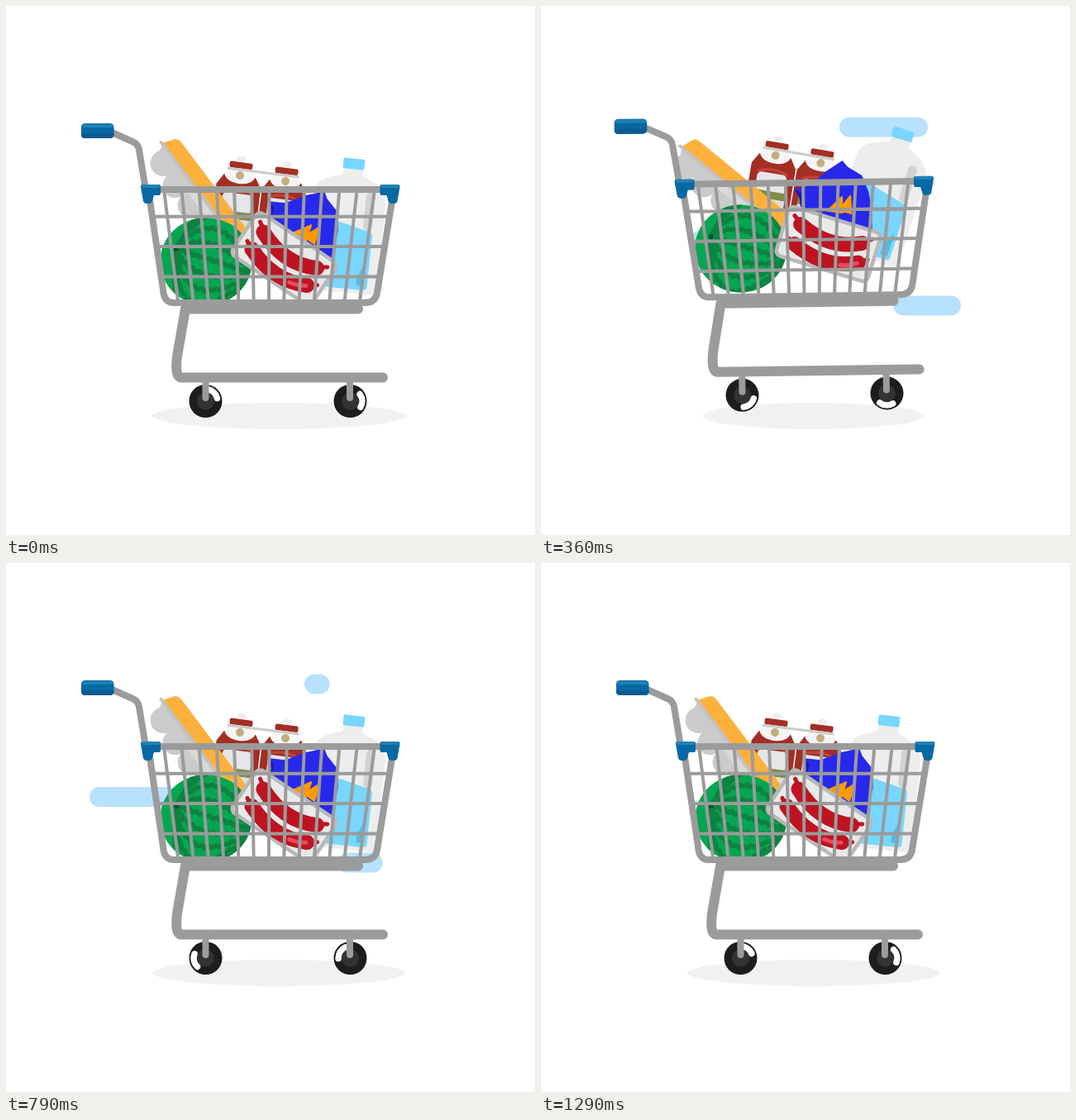
Animation, 640 px wide and 640 px high, one loop 1.37 s. Source, as an HTML page:

```html
<!DOCTYPE html>
<html lang="en">
<head>
<meta charset="utf-8">
<title>Shopping cart</title>
<style>
html, body { margin: 0; width: 100%; height: 100%; overflow: hidden; background: #fff; }
svg { display: block; width: 100vw; height: 100vh; }
.rod { fill: none; stroke: #9b9b9b; stroke-width: 8; stroke-linejoin: round; stroke-linecap: round; }
.thick { stroke-width: 12; }
.thin { stroke-width: 4; }
.blue { fill: #0769a3; }
.light { fill: #2081b5; }
.meat { fill: none; stroke: #be1421; stroke-width: 18; stroke-linecap: round; }
.knob { stroke-width: 5; }
</style>
</head>
<body>
<svg viewBox="0 0 640 640">
  <defs>
    <clipPath id="rind"><ellipse rx="55.5" ry="53"/></clipPath>
    <g id="bottle">
      <ellipse cy="-20" rx="6" ry="3.5" fill="#eee"/>
      <path d="M-14-8H14L20 3V14H-20V3Z" fill="#f5f5f5"/>
      <path d="M-19 0Q-15 10 0 10Q15 10 19 0L27 13V85H-27V13Z" fill="#a32e24"/>
      <path d="M-19 22Q0 13 19 22" fill="none" stroke="#c04238" stroke-width="3"/>
      <rect x="-18" y="22" width="36" height="26" rx="5" fill="#e6e6e6"/>
      <rect x="-20" y="53" width="40" height="15" fill="#ddd"/>
      <rect x="-20" y="44" width="40" height="9" fill="#7f8c48"/>
      <circle cy="60" r="5" fill="#a32e24"/>
      <rect x="-14" y="-16" width="28" height="7.5" rx="2" fill="#a32e24"/>
      <circle r="5" fill="#c3ad80"/>
    </g>
    <g id="wheel">
      <circle r="20" fill="#1d1d1b"/>
      <circle r="10.5" fill="#333"/>
    </g>
    <path id="shine" d="M12-8A14.4 14.4 0 0 1 12 8" fill="none" stroke="#fff" stroke-width="7.500" stroke-linecap="round"/>
    <g id="clip">
      <path class="blue" d="M165 216H185Q187 216 187 218V227Q187 229 185 229H179L177 236Q176 239 173 239H170Q167 239 166 236L163 219Q163 216 165 216Z"/>
      <rect class="light" x="164" y="216" width="22" height="4" rx="2"/>
    </g>
  </defs>

  <g id="streaks" stroke="#b8e0ff" stroke-width="24" stroke-linecap="round"></g>
  <ellipse id="shadow" cx="330" cy="496" ry="16" fill="#f1f1f1"/>

  <g id="cart">
    <g id="jug">
      <path d="M-12 5V12C-15 18-46 16-46 44V148Q-46 156-38 156H35Q43 156 43 148V46C42 20 15 18 12 12V5Z" fill="#ededed"/>
      <rect x="19" y="32" width="11" height="47" rx="5.500" fill="#d2d2d2"/>
      <path d="M-36 65L27 80Q31 81 31 85V146Q31 151 26 151H-36Z" fill="#78d6ff"/>
      <path d="M18 136L27 116V146H18Z" fill="#52b9e5"/>
      <rect x="-13" y="-6.500" width="26" height="13" rx="2" fill="#78d6ff"/>
    </g>
    <g id="sauce">
      <use href="#bottle"/>
      <use href="#bottle" x="55.500"/>
      <path d="M-15-7H70" stroke="#cbcbcb" stroke-width="3" stroke-linecap="round"/>
    </g>
    <g id="chips">
      <path d="M-57-13L-39-19L-20-38L-12-44L-2-52L5-45L23-36L33-16L38 4L42 38L32 50L-16 75L-45 20L-50-2Z" fill="#2828ec"/>
      <path d="M-57-13L-48-8L-45 20L-50-2Z" fill="#1a1ab4"/>
      <path d="M-15 10L1-8L3 11ZM-1 8L11-10L14 11Z" fill="#ff9a00" stroke="#ff9a00" stroke-width="2" stroke-linejoin="round"/>
    </g>
    <g id="carton">
      <path d="M4 0H160V17H127A15 15 0 0 1 98 18A15 15 0 0 1 68 18A15 15 0 0 1 38 18A15.500 15.500 0 1 1 8 8Z" fill="#cbcbcb"/>
      <path d="M66 2H160V11H66Z" fill="#d9d9d9"/>
      <path d="M3-1L8-15Q10-19.500 16-19.500H160V-1Z" fill="#fdb03b"/>
      <path d="M1 0H160" stroke="#c2c2c2" stroke-width="4" stroke-linecap="round"/>
    </g>
    <g id="melon">
      <ellipse rx="55.5" ry="53" fill="#05a651"/>
      <path id="stripes" clip-path="url(#rind)" fill="none" stroke="#0d8242" stroke-width="5.500" stroke-linejoin="round"/>
      <circle cx="-36" cy="-15" r="3" fill="#07522b"/>
    </g>
    <g id="tray">
      <rect x="-58" y="-31" width="116" height="62" rx="7" fill="#e9e9e9" stroke="#b8b8b8" stroke-width="4.500"/>
      <path class="meat knob" d="M-49-21L-38-14M49-21L38-14M-49 7L-38 13M51 4L40 11"/>
      <path class="meat" d="M-39-13Q3 6 39-13M-39 12Q4 30 41 11"/>
      <path d="M21 20Q32 18 40 12" fill="none" stroke="#e94a5c" stroke-width="5" stroke-linecap="round"/>
    </g>

    <path class="rod thick" d="M426 366.500H217L207 424Q204 449 212 449.500H456"/>
    <path class="rod" d="M126 152L153 164Q160 167 161 174L169 222"/>
    <path class="rod thin" id="wires"/>
    <path class="rod" d="M172 222H467M173 228L190 343Q191 359 203 359H434Q447 359 449 347L468 230"/>
    <use href="#clip"/>
    <use href="#clip" transform="translate(639.500 0) scale(-1 1)"/>
    <rect class="blue" x="91" y="142" width="39.500" height="18" rx="4.500"/>
    <path class="light" d="M92 147Q92 143 96 143H126Q130 143 130 147Z"/>
    <path d="M91 154H130.500V156Q130 160 126 160H95.500Q91 160 91 156Z" fill="#0d5a92"/>
    <g transform="translate(241.500 478)"><use href="#wheel"/><use href="#shine" id="shineA"/></g>
    <g transform="translate(416.500 478)"><use href="#wheel"/><use href="#shine" id="shineB"/></g>
    <path class="rod" d="M241.500 452V474M416 452V474"/>
  </g>
</svg>
<script>
const LOOP = 1370, STEP = 1000 / 14, LAST = 18;
const $ = id => document.getElementById(id);

// Each item is tossed from rest by a shift [x, y, angle]; span is start, peak and landing step
const ITEMS = {
  jug:    { rest: [421, 191, 6],    toss: [19, -26, 12.6],  span: [0, 5.2, 9] },
  sauce:  { rest: [283, 205, 7.2],  toss: [5, -33, 6.3],    span: [3, 7, 11] },
  chips:  { rest: [365, 272, 25],   toss: [-2, -31, -25],   span: [1.5, 6.5, 9.6] },
  carton: { rest: [187, 164, 53],   toss: [-19, 12, -14],   span: [1.5, 5.7, 9] },
  melon:  { rest: [242, 309, 0],    toss: [0, -9, 0],       span: [0, 4.5, 7.5] },
  tray:   { rest: [336.5, 306, 34], toss: [13.5, -11, -19], span: [0, 4.3, 7.2] }
};
const STREAKS = [
  { right: 456, y: 146.5, grow: 0.77, fade: 7.2 },
  { right: 496, y: 362.5, grow: 3.1, fade: 8.3 },
  { right: 196, y: 283, grow: 4.7, fade: 12 }
];
const LENGTH = 83;

const ease = x => {
  x = Math.max(0, Math.min(1, x));
  return x * x * (3 - 2 * x);
};
const bump = (k, [start, peak, end]) =>
  k < peak ? ease((k - start) / (peak - start)) : ease((end - k) / (end - peak));
const place = (id, value) => $(id).setAttribute('transform', value);

let wires = '';
for (let i = -6; i <= 6; i++) wires += `M${318.5 + i * 21.2} 224L${318 + i * 18.3} 358`;
for (let i = 1; i <= 3; i++) wires += `M${172 + i * 5.2} ${218.5 + i * 36.3}H${467 - i * 5.4}`;
$('wires').setAttribute('d', wires);

// Jagged meridians fanning out from the stem
let stripes = '';
for (let i = -4; i <= 4; i++) {
  for (let s = 0; s <= 24; s++) {
    const t = s / 24, bow = i * 18 * Math.sin(Math.PI * t ** 0.75) + (s % 2 ? 1.3 : -1.3);
    stripes += `${s ? 'L' : 'M'}${-36 + 98 * t - 0.3 * bow} ${-15 + 31 * t + bow}`;
  }
}
$('stripes').setAttribute('d', stripes);

$('streaks').innerHTML = '<path/>'.repeat(STREAKS.length);
const trails = [...$('streaks').children];

function draw(k) {
  for (const [id, { rest, toss, span }] of Object.entries(ITEMS)) {
    const lift = bump(k, span);
    const [x, y, a] = rest.map((r, i) => r + toss[i] * lift);
    place(id, `translate(${x} ${y}) rotate(${a})`);
  }
  const hop = bump(k, [0, 3.5, 7.6]);
  place('cart', `translate(0 ${-12 * hop}) rotate(${-1.1 * hop} 330 327)`);
  $('shadow').setAttribute('rx', 153 - 22 * bump(k, [0, 4.2, 7.6]));

  const spin = 19.5 * k - 47;
  place('shineA', `rotate(${spin})`);
  place('shineB', `rotate(${spin + 44})`);

  STREAKS.forEach(({ right, y, grow, fade }, i) => {
    const head = ease((k - grow) / 3), tail = ease((k - fade) / 4.6);
    trails[i].setAttribute('d', head > tail ? `M${right - LENGTH * head} ${y}H${right - LENGTH * tail}` : '');
  });
}

function tick() {
  const t = performance.now() % LOOP;
  draw(Math.min(LAST, Math.floor((t + 5) / STEP)));
  requestAnimationFrame(tick);
}
tick();
</script>
</body>
</html>
```
